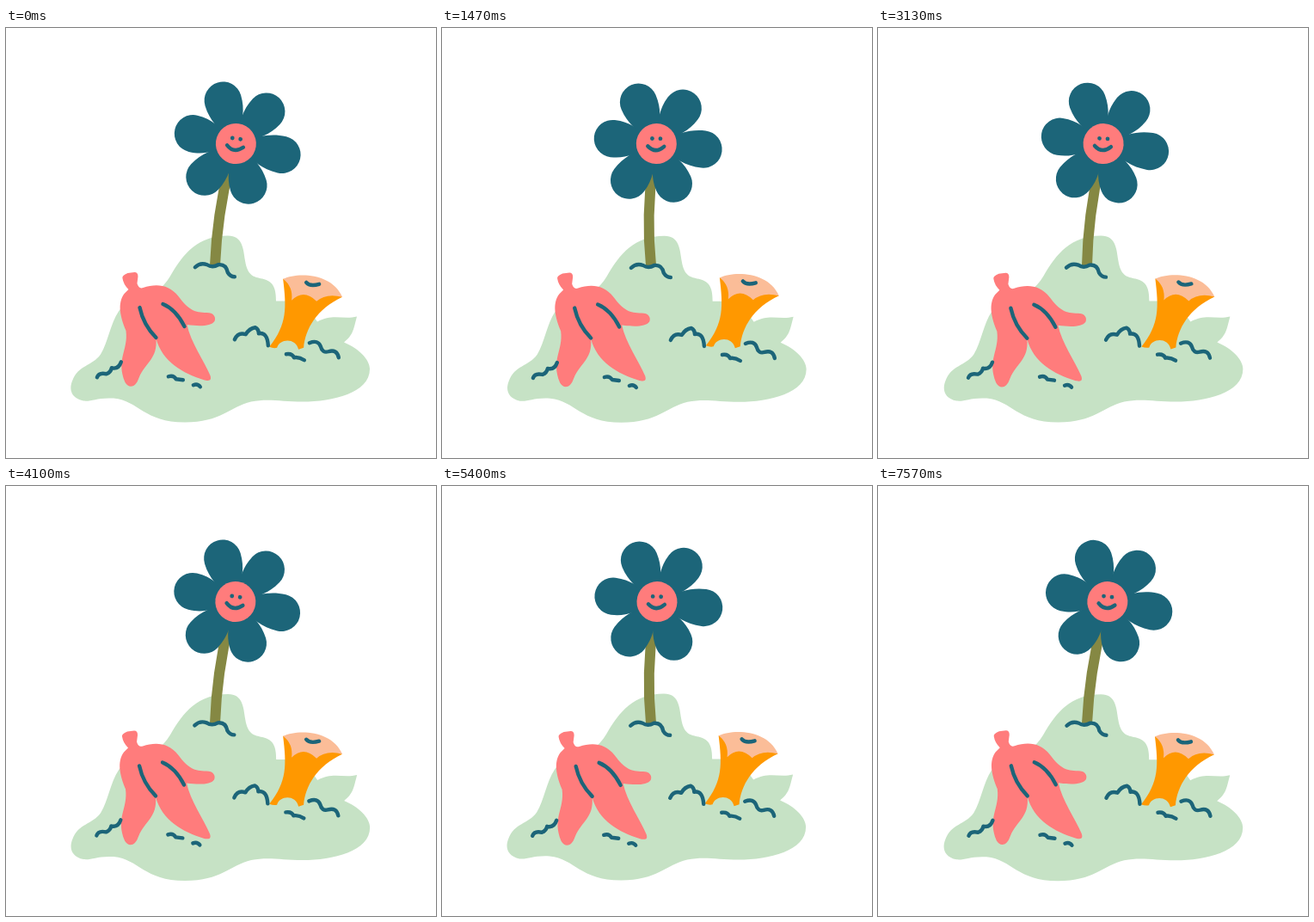
An HTML page for the animation above (7.61 s loop, 500 by 500 pixels).

```html
<!DOCTYPE html>
<html lang="en">
<head>
<meta charset="utf-8">
<title>Swaying flower</title>
<style>
  html, body { margin: 0; width: 100%; height: 100%; overflow: hidden; background: #fff; }
  svg { display: block; width: 100vw; height: 100vh; }
  .ink { fill: none; stroke: #1c6579; stroke-width: 4.4; stroke-linecap: round; stroke-linejoin: round; }
</style>
</head>
<body>
<svg viewBox="0 0 500 500">
  <path id="hill" fill="#c6e2c5" d="M258 241C275 241 276 256 278 270C281 288 288 289 298 291C312 294 314 304 314 317L345 317L362 341C380 331 392 339 408 335C404 350 404 356 393 365C410 372 423 385 423 396C423 424 380 434 345 434C320 434 305 430 285 434C260 440 250 458 208 458C160 458 155 433 125 430C105 429 100 434 90 433C76 430 73 420 77 410C84 391 100 393 110 379C119 364 121 344 131 329C147 306 172 320 191 288C206 262 223 241 258 241Z"/>
  <path id="stem" fill="none" stroke="#858843" stroke-width="12"/>
  <g id="head">
    <g id="petals" fill="#1c6579"></g>
    <circle r="23.5" fill="#ff7c7c"/>
    <g fill="#1c6579"><circle cx="-5" cy="-6" r="2.4"/><circle cx="4.5" cy="-6" r="2.4"/></g>
    <path class="ink" d="M-10 3Q-1 12 9 3"/>
  </g>
  <g id="peel">
    <path fill="#ff7c7c" d="M136 291Q135 288 142 285L150 284Q154 284 154 289L153 297Q155 304 160 302C175 297 190 298 201 312C213 328 220 331 234 331C242 331 245 336 243 341C239 347 225 347 211 345C215 365 231 387 238 404C240 410 237 411 230 409C207 402 182 388 175 361C177 385 163 388 155 407C151 419 143 419 139 412C128 385 143 375 140 352C133 335 130 320 138 309L143 304Q137 298 136 291Z"/>
    <path class="ink" d="M156 325C159 339 164 349 175 360M183 321C195 326 202 335 208 347"/>
  </g>
  <g id="core">
    <path fill="#ff9800" d="M323 292C327 325 328 345 307 371Q312 373 316 372C319 361 338 360 341 374L347 372C349 350 362 327 392 313L362 300Z"/>
    <path fill="#fbbd98" d="M323 292C340 284 380 285 392 313Q373 308 362 318Q347 303 333 317Q335 301 323 292Z"/>
    <path class="ink" d="M350 296Q354 301 365 298"/>
  </g>
  <path id="soil" class="ink" d="M220 279Q226 273 234 276Q240 280 247 276Q256 275 258 285Q261 290 266 290M266 363Q270 354 279 357Q283 350 290 349Q294 351 294 356Q304 354 305 370M353 367Q363 363 366 371Q368 379 375 377Q385 374 387 384M326 380Q333 379 335 384Q341 383 347 387M106 407Q108 401 117 403Q122 401 123 396Q131 398 134 389M189 406Q195 404 198 409L206 410M218 416Q223 414 226 418"/>
</svg>
<script>
const LOOP = 7610, SWAY = 4000, STEP = 1000 / 12;
const $ = id => document.getElementById(id);
const set = (id, name, value) => $(id).setAttribute(name, value);

// six petals, their reach alternating less and less around the ring
function petal(i) {
  const d = 52 + 3 * (-1) ** i / (i + 1), r = 21.7;
  return `<path transform="rotate(${5.5 + 60 * i})" d="M10 -8C${d * .45} -14 ${d * .65} ${-r} ${d} ${-r}A${r} ${r} 0 0 1 ${d} ${r}C${d * .65} ${r} ${d * .45} 14 10 8Z"/>`;
}
$('petals').innerHTML = Array.from({ length: 6 }, (_, i) => petal(i)).join('');

// seeded random number from 0 to 1
function noise(seed) {
  const n = Math.sin(seed * 12.9898) * 43758.5453;
  return n - Math.floor(n);
}

// hand-drawn wobble: each part shifts a little at every step
function wobble(id, seed, x, y) {
  set(id, 'transform', `translate(${x * noise(seed)} ${y * noise(seed + .5)})`);
}

// sway from 1 (right) to -1 (left), shifted in time
const swing = (t, lead) => Math.cos((t + lead) / SWAY * 2 * Math.PI);

function draw(t) {
  const step = Math.floor(t / STEP);
  wobble('hill', step, 1.5, 2);
  wobble('peel', step + 100, -2, 1);
  wobble('core', step + 200, -1.5, -2);
  wobble('soil', step + 300, -1, -1);

  // the stem leads, the head follows and its tilt trails behind
  const bend = swing(t, 300);
  set('stem', 'd', `M243 276Q${241.3 + 4.5 * bend} 218 ${253 + 8 * bend} 158`);
  set('head', 'transform', `translate(${257.7 + 10 * swing(t, 160)} 134.6) rotate(${3.6 + 4.3 * swing(t, -100)})`);
}

const start = performance.now();
function tick() {
  draw((performance.now() - start) % LOOP);
  requestAnimationFrame(tick);
}
tick();
</script>
</body>
</html>
```
